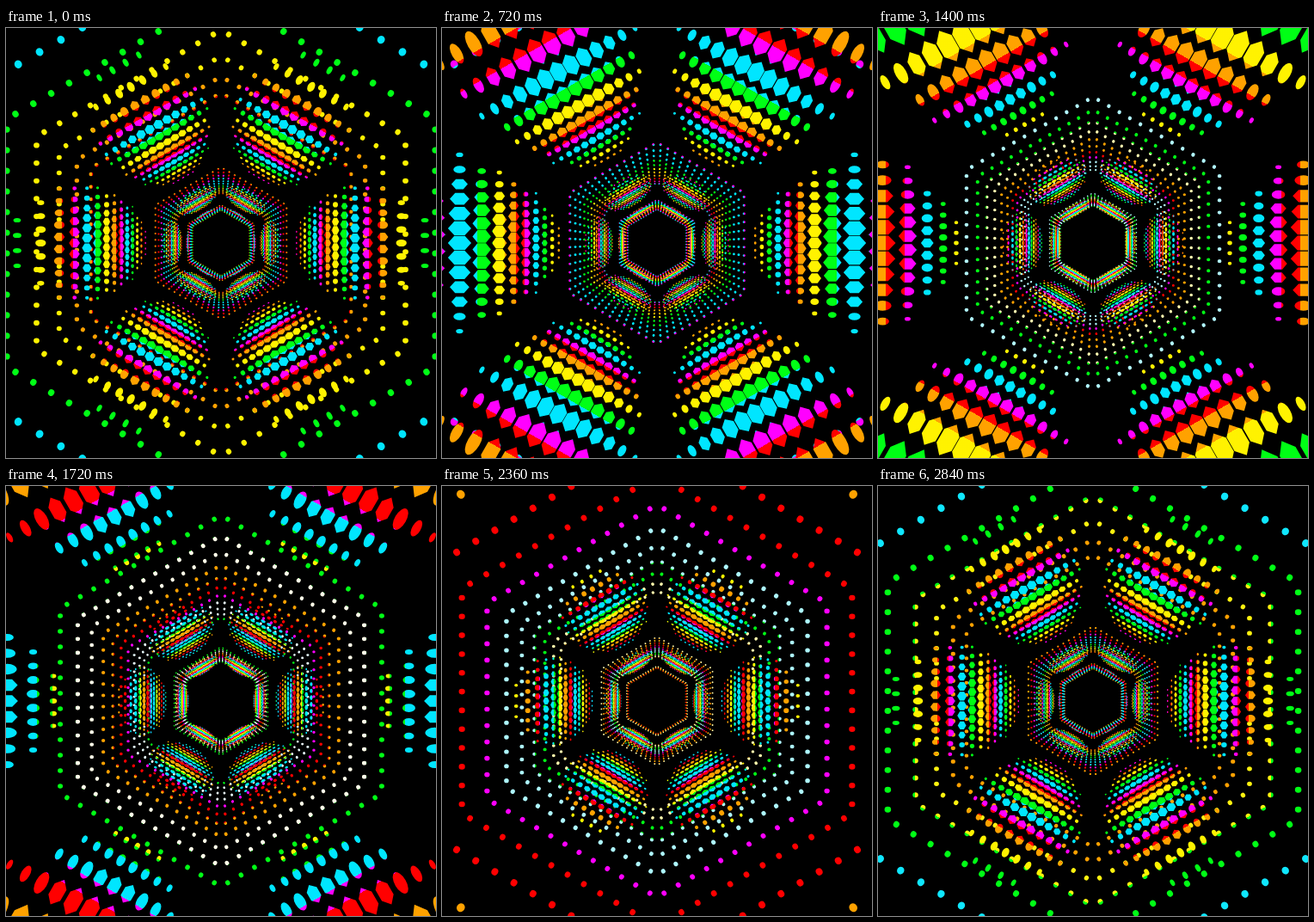
Write an HTML page with a canvas that moves like this. It is 500 px wide and 500 px high and loops after 2880 ms.

```html
<!DOCTYPE html>
<html lang="en">
<head>
<meta charset="utf-8">
<title>Hexagonal dot tunnel</title>
<style>
  html, body { margin: 0; width: 100%; height: 100%; overflow: hidden; background: #000; }
  canvas { display: block; width: 500px; height: 500px; }
</style>
</head>
<body>
<canvas id="stage" width="500" height="500"></canvas>
<script>
const ctx = document.getElementById('stage').getContext('2d');
const LOOP = 2880, STEP = 40;
const NEAR = 345;   // greatest distance from the centre

// Each layer is a wall of dot rows. pitch: row spacing in 1 / distance,
// rows: rows travelled per loop, across: spacing along a row,
// hueStep and hueZero: colour change per row and the row of hue angle 0
const SWELL = { far: 38, pitch: 0.00055, rows: 19, start: 0.67, across: 0.0745, hueStep: 72, hueZero: 14.5 };
const SPARSE = { far: 33, pitch: 0.000652, rows: 20, start: 0.15, across: 1.1547 / 12, hueStep: 36, hueZero: 9.5 };
const MIDDLE = 13.7;      // row at the heart of a swelling
const SPARSE_ROWS = 11;   // rows between two swellings

// Start of each colour band in degrees, its hue, and whether it can turn pale
const BANDS = [
  [35, 57, true], [90, 125, false], [147, 186, true],
  [245, 300, false], [282, 0, false], [335, 38, false]
];

const mod = (a, b) => (a % b + b) % b;
const distance = (layer, z) => 1 / (z * layer.pitch);

function bandGradient(layer, t, pale) {
  const { far, hueStep, hueZero } = layer;
  const gradient = ctx.createLinearGradient(far, 0, NEAR, 0);
  let previous = 'hsl(38 100% 50%)';
  for (let turn = -14; turn <= 3; turn++) {
    for (const [start, hue, canPale] of BANDS) {
      const z = hueZero - (start + 360 * turn + 1080 * t) / hueStep;
      const x = z > 0 ? distance(layer, z) : NEAR;
      const at = Math.min(1, Math.max(0, (x - far) / (NEAR - far)));
      const color = `hsl(${hue} 100% ${canPale ? 50 + 47 * pale : 50}%)`;
      gradient.addColorStop(at, previous);
      gradient.addColorStop(at, color);
      previous = color;
    }
  }
  return gradient;
}

function eachRow(layer, t, visit) {
  const travel = layer.rows * t - layer.start;
  const first = Math.ceil(travel + 1 / (NEAR * layer.pitch));
  const last = travel + 1 / (layer.far * layer.pitch);
  for (let row = first; row < last; row++) visit(row, distance(layer, row - travel));
}

function addHexagon(path, x, y, rx, ry) {
  path.moveTo(x + rx, y);
  path.lineTo(x + rx * 0.45, y + ry);
  path.lineTo(x - rx * 0.45, y + ry);
  path.lineTo(x - rx, y);
  path.lineTo(x - rx * 0.45, y - ry);
  path.lineTo(x + rx * 0.45, y - ry);
  path.closePath();
}

function addDot(path, x, y, rx, ry) {
  path.moveTo(x + rx, y);
  path.ellipse(x, y, rx, ry, 0, 0, 7);
}

function swellPath(t) {
  const path = new Path2D();
  eachRow(SWELL, t, (row, x) => {
    const local = 2 + mod(row - 2, SWELL.rows);
    const gap = x * x * SWELL.pitch;
    const shift = local % 2 ? 0.5 : 0;
    for (let i = -6; i <= 6; i++) {
      const w = (i + shift) * SWELL.across;
      const rim = Math.hypot((local - MIDDLE) / 7, w / 0.47);
      if (rim >= 1) continue;
      const size = Math.min(1, 0.28 + 0.78 * (1 - rim * rim));
      const rx = Math.max(0.8, 0.47 * gap * size);
      const ry = Math.max(0.8, 0.036 * x * size);
      (size > 0.7 ? addHexagon : addDot)(path, x, w * x, rx, ry);
    }
  });
  return path;
}

function sparsePath(t) {
  const path = new Path2D();
  eachRow(SPARSE, t, (row, x) => {
    if (mod(row, SPARSE.rows) >= SPARSE_ROWS) return;
    const r = Math.max(0.8, 0.0145 * x);
    for (let i = -6; i < 6; i++) {
      addDot(path, x, (i + 0.5) * SPARSE.across * x, r * 1.1, r);
    }
  });
  return path;
}

function draw(t) {
  const pale = Math.max(0, Math.sin(Math.PI * (t - 0.3) / 0.7));
  const sparse = sparsePath(t), swell = swellPath(t);
  const sparseFill = bandGradient(SPARSE, t, pale);
  const swellFill = bandGradient(SWELL, t, 0);
  ctx.setTransform(1, 0, 0, 1, 0, 0);
  ctx.fillStyle = '#000';
  ctx.fillRect(0, 0, 500, 500);
  ctx.translate(250, 250);
  for (let wall = 0; wall < 6; wall++) {
    ctx.fillStyle = sparseFill;
    ctx.fill(sparse);
    ctx.fillStyle = swellFill;
    ctx.fill(swell);
    ctx.rotate(Math.PI / 3);
  }
}

function tick() {
  const time = performance.now() % LOOP;
  draw(Math.floor(time / STEP) * STEP / LOOP);
  requestAnimationFrame(tick);
}
tick();
</script>
</body>
</html>
```
